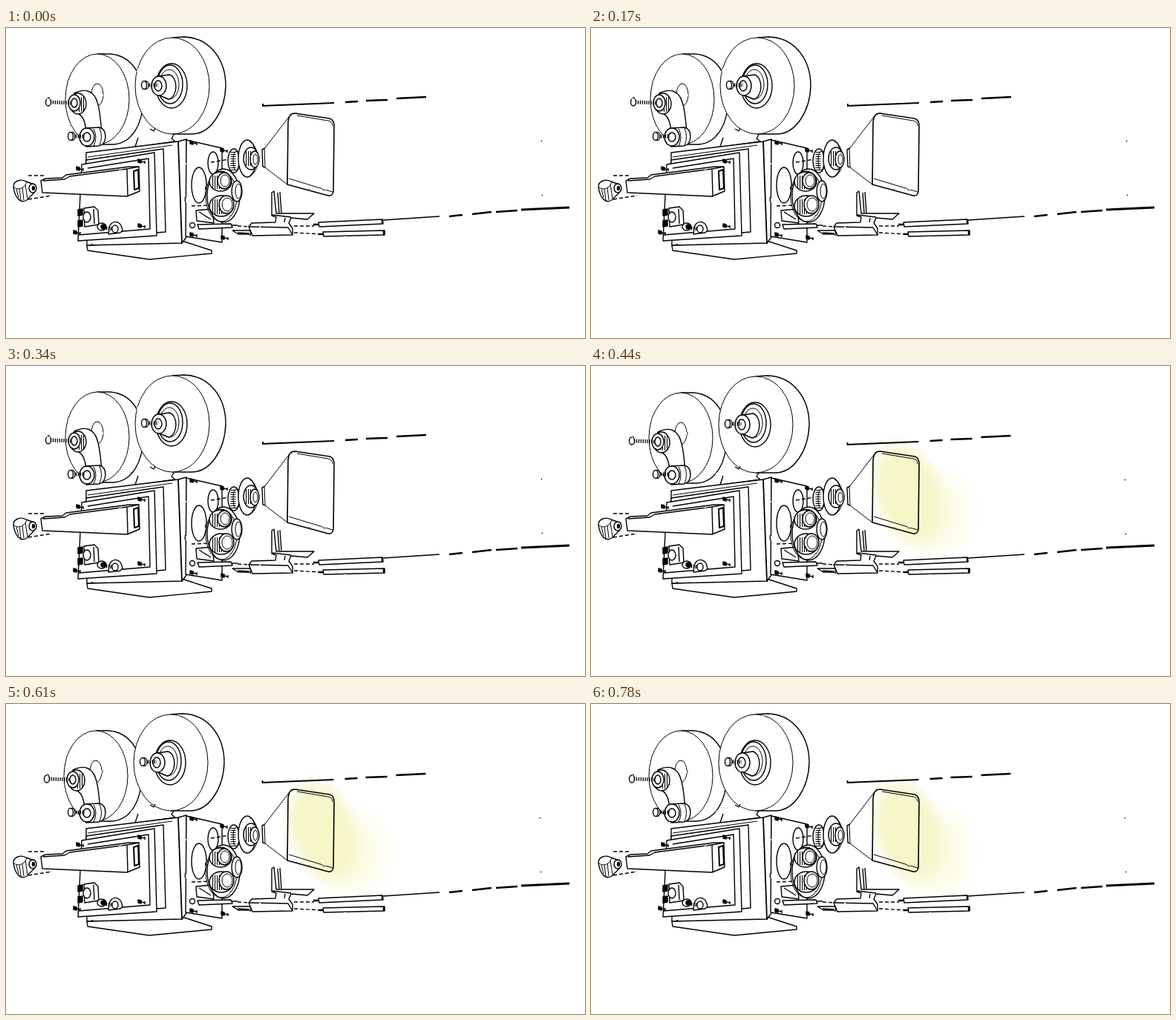
Animation of 780 by 418 pixels, one loop 850 ms. Source, as an HTML page:

```html
<!DOCTYPE html>
<html lang="en">
<head>
<meta charset="utf-8">
<title>Film camera with flickering lamp</title>
<style>
html, body { margin: 0; width: 100%; height: 100%; overflow: hidden; background: #fff; }
svg { display: block; width: 780px; height: 418px; }
.ink { fill: #fff; stroke: #000; stroke-width: 1.4; stroke-linejoin: round; filter: url(#rough); }
.line { fill: none; }
.thin { stroke-width: 1; }
.solid { fill: #000; }
.hatch { fill: none; stroke-dasharray: 1.1 1.9; }
.thread { fill: none; stroke-width: 5; stroke-dasharray: 1.3 1.6; }
.dash { fill: none; stroke-dasharray: 5 3; }
.bold { fill: none; stroke-width: 2.5; }
.glow { visibility: hidden; mix-blend-mode: multiply; }
.lit .glow { visibility: visible; }
.lit .sway { transform: translate(-2px, 1px); }
.lit .dip { transform: translate(-.5px, 1px); }
</style>
</head>
<body>
<svg viewBox="0 0 780 418">
<defs>
  <filter id="rough" filterUnits="userSpaceOnUse" x="0" y="0" width="780" height="418" color-interpolation-filters="sRGB">
    <feTurbulence type="fractalNoise" baseFrequency=".08" numOctaves="2" seed="4"/>
    <feDisplacementMap in="SourceGraphic" scale="1.6" xChannelSelector="R" yChannelSelector="G"/>
  </filter>
  <radialGradient id="light">
    <stop offset=".6" stop-color="#f6f6c8"/>
    <stop offset="1" stop-color="#f6f6c8" stop-opacity="0"/>
  </radialGradient>
  <radialGradient id="haze">
    <stop offset=".4" stop-color="#fbfbe6"/>
    <stop offset="1" stop-color="#fbfbe6" stop-opacity="0"/>
  </radialGradient>
  <g id="screw">
    <path class="solid" d="M-3-2L1-1L1 3L-3 2Z"/>
    <path class="line" d="M1 1L6 2M6 0V4"/>
  </g>
  <g id="bolt">
    <path class="thread" d="M3 0H18"/>
    <ellipse cx="1" rx="4" ry="5.5"/>
    <ellipse cx="-1" rx="3.5" ry="5.5"/>
  </g>
</defs>

<g class="ink">
  <!-- film magazines -->
  <g class="sway">
    <path d="M123 35L140 35C170 37 186 65 185 97C184 130 170 155 145 157L123 157Z"/>
    <ellipse class="thin" cx="123" cy="96" rx="43" ry="61"/>
    <ellipse class="thin" cx="123" cy="90" rx="8" ry="15"/>
    <path d="M92 88C108 80 119 86 123 100C127 112 127 124 129 139L108 140C107 128 104 119 98 116Z"/>
    <ellipse cx="97" cy="102" rx="11" ry="14"/>
    <path class="hatch" stroke-width="20" d="M98 103H107"/>
    <ellipse cx="92" cy="101" rx="8" ry="11"/>
    <ellipse cx="92" cy="101" rx="4" ry="6"/>
    <path class="thread" stroke-width="4" d="M60 100L89 101"/>
    <ellipse cx="57" cy="100" rx="3.5" ry="5"/>

    <path d="M224 13L240 12C275 13 296 43 296 78C295 112 276 143 250 143L224 143Z"/>
    <ellipse class="thin" cx="224" cy="78" rx="50" ry="65"/>
    <ellipse cx="223" cy="78" rx="21" ry="30"/>
    <ellipse cx="221" cy="76" rx="17" ry="26"/>
    <ellipse class="thin" cx="220" cy="76" rx="13" ry="20"/>
    <path d="M207 65L220 63C232 66 232 93 219 96L207 91Z"/>
    <ellipse cx="206" cy="78" rx="10" ry="13"/>
    <ellipse cx="205" cy="78" rx="5" ry="7"/>
    <use href="#bolt" x="187" y="77"/>
  </g>
  <path d="M108 135L126 134Q134 136 134 147Q133 158 125 159L108 160Z"/>
  <path class="line thin" d="M118 136Q124 147 118 159M126 135Q131 147 126 158"/>
  <ellipse cx="109" cy="147" rx="10" ry="12"/>
  <ellipse cx="109" cy="147" rx="5" ry="6"/>
  <use href="#bolt" x="88" y="146"/>
  <path class="line" d="M178 148L174 160M172 161L228 153M194 136L199 139L201 135M226 144L223 149L228 153"/>

  <!-- body -->
  <path d="M109 293L237 287L277 300L277 304L193 312L110 300Z"/>
  <path d="M108 168L232 153L243 150L243 282L237 290L109 293Z"/>
  <path class="line" stroke-width="1.8" d="M232 153L237 291"/>
  <path class="line thin" d="M110 174L224 158"/>
  <path d="M243 151L291 162L291 289L242 281Z"/>
  <path d="M108 178L212 163L215 275L108 284Z"/>
  <path d="M102 184L200 168L203 280L97 287Z"/>
  <path class="line" d="M110 189L192 176L194 271L98 279"/>
  <g>
    <use href="#screw" x="98" y="189"/>
    <use href="#screw" x="181" y="179"/>
    <use href="#screw" x="181" y="266"/>
    <use href="#screw" x="94" y="275"/>
    <use href="#screw" x="251" y="154"/>
    <use href="#screw" x="292" y="164"/>
    <use href="#screw" x="251" y="278"/>
    <use href="#screw" x="293" y="282"/>
  </g>

  <!-- door fittings -->
  <path d="M105 243L119 241L124 246L125 265L106 268Z"/>
  <path class="line" d="M118 244L119 264"/>
  <ellipse cx="109" cy="255" rx="5" ry="7"/>
  <path class="solid" d="M97 245L103 244V252L97 253ZM97 260L103 259V267L97 268Z"/>
  <path d="M139 270C140 260 154 256 157 273L154 276L138 278Z"/>
  <ellipse cx="129" cy="268" rx="6" ry="5"/>
  <ellipse class="solid" cx="131" cy="268" rx="3" ry="3"/>
  <path class="thread" d="M135 270L146 271"/>
  <ellipse cx="147" cy="271" rx="4" ry="5"/>

  <!-- viewfinder -->
  <path class="dash" d="M30 199L54 199M30 231L62 226"/>
  <path d="M47 206L53 203L76 202L81 198L166 187L179 187L180 220L163 227L49 222Z"/>
  <path class="line" d="M50 206L79 204L86 200L163 190L164 226M163 190L179 187"/>
  <path stroke-width="2" d="M172 193L178 191L179 216L173 218Z"/>
  <path d="M10 214C10 206 20 203 27 207L38 211L38 222L28 232C20 237 12 230 10 214Z"/>
  <path class="line thin" d="M10 214C16 220 26 216 28 207M14 217L17 229M18 217L20 232M22 215L24 232M26 211L29 230"/>
  <ellipse cx="36" cy="216" rx="5" ry="6"/>
  <ellipse class="solid" cx="37" cy="216" rx="1.5" ry="2.5"/>

  <!-- lens turret -->
  <ellipse cx="279" cy="182" rx="7" ry="15"/>
  <ellipse cx="260" cy="212" rx="10" ry="24"/>
  <path d="M256 246L278 244L280 263L257 260Z"/>
  <path class="line" d="M260 248L276 258"/>
  <path class="dash" d="M250 240L277 239M276 181L301 177"/>
  <ellipse cx="293" cy="226" rx="22" ry="36"/>
  <ellipse class="line thin" cx="290" cy="227" rx="21" ry="34"/>
  <ellipse cx="311" cy="220" rx="7" ry="14"/>
  <ellipse class="thin" cx="313" cy="220" rx="4" ry="10"/>
  <ellipse cx="289" cy="207" rx="15" ry="13"/>
  <path class="hatch" stroke-width="18" d="M278 208H299"/>
  <ellipse cx="294" cy="206" rx="9" ry="11"/>
  <ellipse class="thin" cx="295" cy="206" rx="6" ry="8"/>
  <ellipse cx="290" cy="240" rx="16" ry="14"/>
  <path class="hatch" stroke-width="20" d="M278 241H300"/>
  <ellipse cx="297" cy="238" rx="10" ry="12"/>
  <ellipse class="thin" cx="298" cy="238" rx="7" ry="9"/>

  <!-- detached lens -->
  <ellipse cx="307" cy="179" rx="8" ry="16"/>
  <path class="hatch" stroke-width="7" d="M306 167V192"/>
  <ellipse class="line thin" cx="310" cy="179" rx="4" ry="13"/>
  <ellipse cx="325" cy="176" rx="12" ry="25"/>
  <path class="line thin" d="M328 153C343 160 343 194 328 200"/>
  <ellipse cx="330" cy="176" rx="10" ry="15"/>
  <path class="hatch" stroke-width="20" d="M323 176H335"/>
  <ellipse cx="335" cy="177" rx="6" ry="11"/>
  <ellipse class="thin" cx="336" cy="177" rx="3" ry="7"/>

  <!-- lamp hood -->
  <path d="M345 164L349 162L350 188L346 187Z"/>
  <path class="thin" d="M348 163L384 116L392 115L381 128L379 211L349 188Z"/>
  <path stroke-width="1.6" d="M389 115L436 122Q442 124 442 132L441 220Q440 227 434 226L379 211L380 127Q381 115 389 115Z"/>
  <path class="line thin" d="M381 203L440 221M392 118L434 125Q440 126 440 132"/>

  <!-- mount and rods -->
  <path d="M258 265L303 264L305 269L260 271Z"/>
  <circle cx="251" cy="266" r="3.5"/>
  <path d="M305 273L329 273L330 278L313 278Z"/>
  <path class="line" d="M304 266L312 266M312 276L328 277"/>
  <path class="dash" d="M312 267L330 268M388 267L415 267M388 276L426 278"/>
  <path d="M358 222L361 220L364 250L415 250L406 258L384 256L381 263L386 270L386 279L332 280L327 268L331 263L363 262L364 255L358 253Z"/>
  <path class="line" d="M366 222L368 249M369 221L371 249M359 252L384 255M328 268L380 269L386 279M376 256L375 262"/>
  <path d="M421 262L507 258L508 264L422 268Z"/>
  <path d="M427 275L510 273V279L428 281Z"/>
  <path class="bold" d="M414 265L421 265M421 278L428 278M507 259V264M509 274V279"/>

  <!-- light beam edges -->
  <g class="dip">
    <path class="line" stroke-width="1.8" d="M345 105L442 101M346 102V106"/>
    <path class="bold" d="M457 100L474 99M485 98L514 97M526 95L566 93"/>
  </g>
  <path class="line" stroke-width="1.6" d="M508 259L584 254"/>
  <path class="bold" d="M597 254L615 252M628 251L654 248M660 248L689 246"/>
  <path class="line" stroke-width="3" d="M694 245L759 242"/>
  <path class="line sway" d="M721 152L722 153M722 225L723 226"/>
</g>

<g class="glow">
  <ellipse cx="465" cy="200" rx="62" ry="72" fill="url(#haze)"/>
  <ellipse cx="427" cy="172" rx="53" ry="82" fill="url(#light)" transform="rotate(-20 427 172)"/>
</g>
</svg>
<script>
const DARK = 100, CYCLE = 170;
const svg = document.querySelector('svg');

function draw() {
  svg.classList.toggle('lit', performance.now() % CYCLE >= DARK);
  requestAnimationFrame(draw);
}
draw();
</script>
</body>
</html>
```
